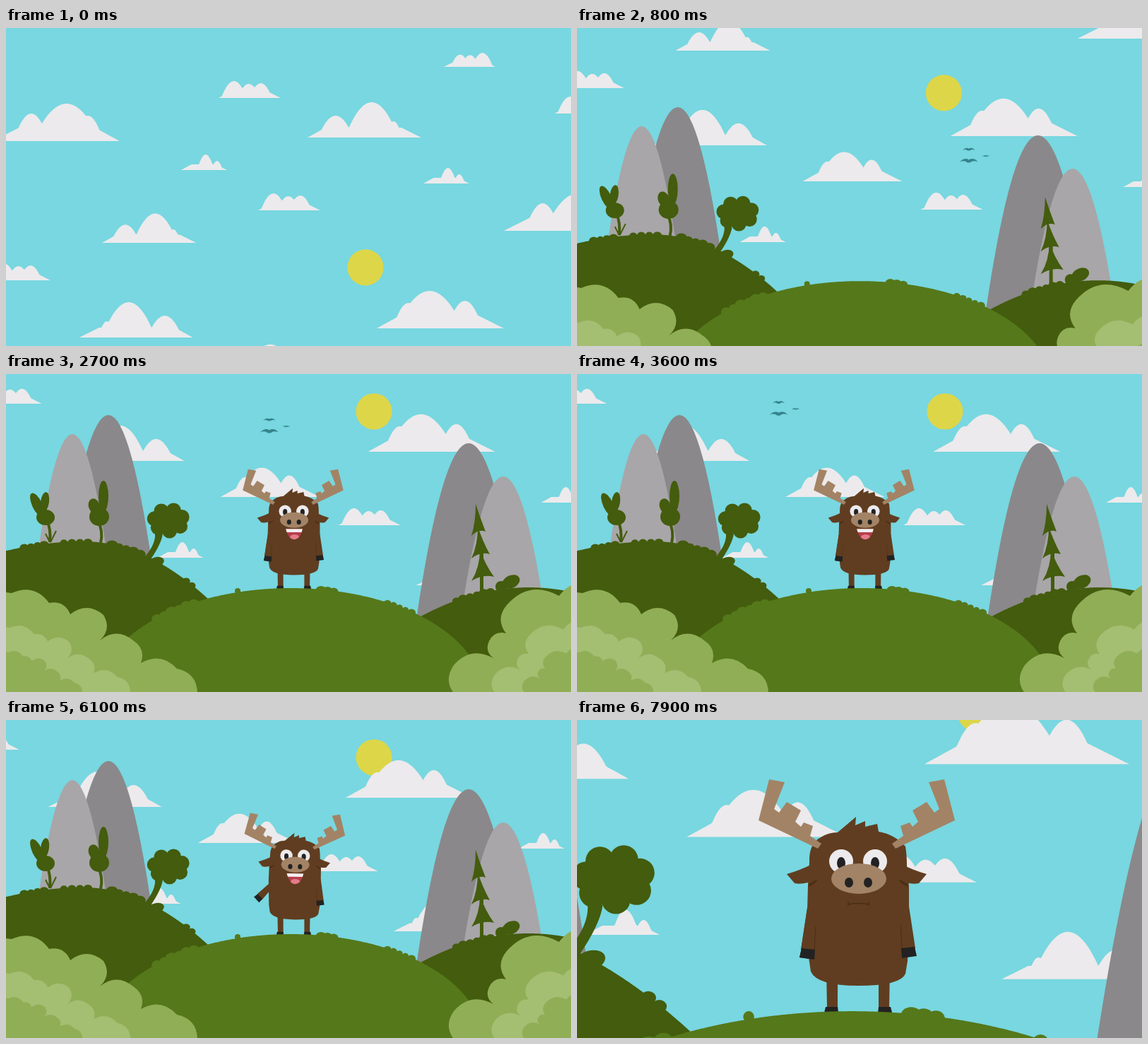
Recreate the animation shown at these times as an HTML page with a canvas. Size 800x450 px, loop 8000 ms.

```html
<!DOCTYPE html>
<html>
<head>
<meta charset="utf-8">
<title>Moose on a hill</title>
<style>
html, body { margin: 0; width: 100%; height: 100%; overflow: hidden; background: #78d7e0; }
canvas { display: block; width: 100vw; height: 100vh; }
</style>
</head>
<body>
<canvas id="stage" width="800" height="450"></canvas>
<script>
const g = document.getElementById('stage').getContext('2d');
const LOOP = 8000, STEP = 100, ZOOM = 1.949;
const SKY = '#78d7e0', DARK = '#435c0d', HILL = '#55781a', LEAF = '#90ae56', LIGHT = '#a4be72';
const ROCK = '#8a888a', PALE_ROCK = '#a8a6a8';
const FUR = '#603d20', FUR_DARK = '#4c2e15', TAN = '#a38365', BLACK = '#222', WHITE = '#eceaec';

const clamp = v => Math.max(0, Math.min(1, v));
const smooth = u => { u = clamp(u); return u * u * (3 - 2 * u); };
const ramp = (t, a, b) => smooth((t - a) / (b - a));
const noise = n => { const v = Math.sin(n * 12.9898) * 43758.5453; return v - Math.floor(v); };

function fill(color, path) {
  g.fillStyle = color;
  g.fill(new Path2D(path));
}
function line(color, width, path) {
  g.strokeStyle = color;
  g.lineWidth = width;
  g.stroke(new Path2D(path));
}
function oval(color, x, y, rx, ry = rx, deg = 0) {
  g.fillStyle = color;
  g.beginPath();
  g.ellipse(x, y, rx, ry, deg * Math.PI / 180, 0, 7);
  g.fill();
}
// Area between a curve y = f(x) and a flat base.
function area(color, f, x0, x1, base) {
  g.fillStyle = color;
  g.beginPath();
  g.moveTo(x0, base);
  for (let x = x0; x <= x1; x++) g.lineTo(x, f(x));
  g.lineTo(x1, base);
  g.fill();
}
function mirrored(axis, part) {
  part();
  g.save();
  g.translate(2 * axis, 0);
  g.scale(-1, 1);
  part();
  g.restore();
}

// Perspective camera: depth p sets both parallax and zoom.
let pan = 0, zoom = 0;
function camera(p) {
  const s = 1 / (1 - (1 - 1 / ZOOM) * zoom * p);
  const ox = p * (8.5 * zoom + 17 * pan), oy = -p * (18 * zoom + 405 * pan);
  g.setTransform(s, 0, 0, s, 400 - s * (400 + ox), 225 - s * (225 + oy));
}

// Cloud: a low skirt topped by humps [centre, height, half width].
const cloudShapes = {
  A: { width: 180, skirt: 18, humps: [[45, 36, 22], [75, 53, 48], [125, 39, 25]] },
  B: { width: 161, skirt: 14, humps: [[40, 31, 25], [91, 50, 38], [122, 23, 12]] },
  C: { width: 88, skirt: 8, humps: [[22, 24, 18], [43, 20, 16], [60, 21, 16]] },
  D: { width: 65, skirt: 8, humps: [[35, 22, 12], [51, 13, 8]] }
};
// shape, x, y, scale (negative is mirrored)
const clouds = [
  ['A', 538, 110, 1], ['A', -6, -155, -1], ['A', 718, -28, -1], ['A', 329, 174, .78],
  ['B', 440, -160, 1], ['B', 149, -11, .83], ['B', 117, 123, -1], ['B', 606, 299, -.83],
  ['C', 314, -216, 1], ['C', 633, -260, -.83], ['C', 370, -57, 1], ['C', -12, 42, 1],
  ['C', 790, -194, 1], ['C', 496, 214, 1],
  ['D', 261, -114, 1], ['D', 604, -95, 1], ['D', 240, 260, 1], ['D', 783, 182, 1]
];
function drawClouds(t) {
  for (const [kind, x, y, scale] of clouds) {
    const { width, skirt, humps } = cloudShapes[kind];
    const top = u => -Math.max(
      Math.min(u * .55, (width - u) * .5, skirt),
      ...humps.map(([c, h, w]) => h * (1 - ((u - c) / w) ** 2)));
    g.save();
    g.translate(x - 9.4 * t + (scale < 0 ? -width * scale : 0), y);
    g.scale(scale, Math.abs(scale));
    area(WHITE, top, 0, width, 0);
    g.restore();
  }
}

function drawBirds(t) {
  for (const [x, y, size] of [[460, 105, 1], [460, 89, .68], [484, 98.5, .42]]) {
    g.save();
    g.translate(x - 97 * (t - 1.8), y - 27.3 * (t - 1.8));
    g.scale(size, size);
    fill('#35838c', 'M-13 2Q-5-5 0-1Q7-5 13 2Q6-1 2 3L-2 3Q-6-1-13 2Z');
    g.restore();
  }
}

function mountain(color, x, top, k, base) {
  const w = k * Math.sqrt(base - top);
  fill(color, `M${x - w} ${base}Q${x} ${2 * top - base} ${x + w} ${base}Z`);
}
function drawMountains() {
  mountain(ROCK, 145, 58, 4.25, 300);
  mountain(PALE_ROCK, 94, 85, 3.76, 300);
  mountain(ROCK, 655, 98, 4.69, 370);
  mountain(PALE_ROCK, 704, 145, 4.26, 340);
}

const leftLand = x => 237 + (x < 110 ? .0011 : .00262) * (x - 110) ** 2;
const rightLand = x => 302 + .00176 * (x - 740) ** 2;
const hillTop = x => 453 - 150 * Math.sqrt(Math.max(0, 1 - ((x - 403) / 272) ** 2));

// Row of small round shrubs along the ground.
function shrubs(color, ground, x0, x1, size) {
  const n = Math.max(1, Math.round((x1 - x0) / size / 1.4));
  for (let i = 0; i <= n; i++) {
    const x = x0 + (x1 - x0) * i / n, r = size * (.75 + .4 * noise(i + x0));
    oval(color, x, ground(x) + r * .2, r, r * .85);
  }
}

function pine() {
  g.fillStyle = DARK;
  g.fillRect(671, 240, 5, 72);
  for (let i = 0; i < 3; i++) {
    const x = 669 + 3 * i, base = 225 + 32 * i, w = 10 + 3 * i;
    fill(DARK, `M${x - 4} ${base - 41}Q${x - 4} ${base - 15} ${x - w} ${base + 4}Q${x} ${base - 6} ${x + w} ${base - 2}Q${x + 3} ${base - 20} ${x - 4} ${base - 41}Z`);
  }
}
function roundTree() {
  for (let i = 0; i < 7; i++) {
    const a = i / 7 * 2 * Math.PI - 1.2;
    oval(DARK, 230 + 20 * Math.cos(a), 207 + 15 * Math.sin(a), 10.5);
  }
  oval(DARK, 230, 207, 23, 18);
  fill(DARK, 'M211 226L222 226Q220 240 205 262L198 257Q212 240 211 226Z');
}
function saplings() {
  oval(DARK, 44, 185, 7, 18, -25);
  oval(DARK, 55, 181, 6, 14, 8);
  oval(DARK, 56, 203, 13, 11);
  line(DARK, 4, 'M58 207Q64 220 62 238M130 208Q138 222 134 239');
  line(DARK, 2, 'M63 238L71 222M62 238L56 226');
  oval(DARK, 138, 173, 7, 22);
  oval(DARK, 125, 187, 8, 11, -20);
  oval(DARK, 132, 202, 14, 13);
}

function drawLand() {
  area(DARK, leftLand, -40, 300, 650);
  area(DARK, rightLand, 565, 860, 650);
  shrubs(DARK, leftLand, 26, 54, 7);
  shrubs(DARK, leftLand, 82, 116, 7);
  shrubs(DARK, leftLand, 150, 190, 8);
  shrubs(DARK, leftLand, 255, 263, 5);
  oval(DARK, 213, 266, 11, 7, -15);
  shrubs(DARK, rightLand, 638, 686, 7);
  oval(DARK, 701, 301, 8);
  oval(DARK, 715, 294, 13, 9, -25);
  saplings();
  roundTree();
  pine();
}

function drawHill() {
  area(HILL, hillTop, 131, 675, 650);
  shrubs(HILL, hillTop, 214, 266, 8);
  shrubs(HILL, hillTop, 446, 464, 7);
  shrubs(HILL, hillTop, 540, 574, 6);
  oval(HILL, 328, 307, 4);
}

// Lobed outline around a bottom corner, repeated smaller for each inner layer.
function bush(corner, side, pts) {
  [[LEAF, 1], [LIGHT, .65], [LEAF, .4]].forEach(([color, k]) => {
    const at = ([x, y]) => [corner + (x - corner) * k, 450 + (y - 450) * k];
    g.fillStyle = color;
    g.beginPath();
    g.moveTo(corner, 600);
    pts.map(at).forEach(([u, v], i, all) => {
      if (!i) return g.lineTo(u, v);
      const [x, y] = all[i - 1];
      g.quadraticCurveTo((x + u) / 2 + side * (v - y) * .4, (y + v) / 2 - side * (u - x) * .4, u, v);
    });
    g.lineTo(pts[pts.length - 1][0], 600);
    g.fill();
  });
}
function drawBushes() {
  bush(0, 1, [[-40, 335], [8, 310], [61, 324], [91, 340], [138, 341], [133, 377], [180, 377], [191, 409], [242, 417], [271, 452]]);
  bush(800, -1, [[840, 300], [783, 314], [709, 327], [708, 367], [684, 378], [690, 402], [634, 412], [637, 455]]);
}

function antler() {
  fill(TAN, 'M272 83L294 87L279 125L286 130L297 115L317 127L309 143L317 150L321 144L334 149L330 163L346 174L341 181L257 141Z');
}
function ear() {
  fill(FUR, 'M335 202Q315 212 297 217L308 230Q320 233 342 224Z');
}
function leg() {
  fill(FUR, 'M353 350H369V408H354Z');
  fill(BLACK, 'M352 405H369L370 413H350Z');
}
function arm() {
  fill(FUR, 'M326 265Q332 258 338 268L337 326L317 324Z');
  line(FUR_DARK, 1, 'M337.5 292L336 325');
  fill(BLACK, 'M318 322L337 324L336 338L315 335Z');
}
function eye() {
  oval(WHITE, 374, 199, 17);
  oval(BLACK, 374, 201.5, 6, 8.5);
}
function mouth(open) {
  if (!open) return line(FUR_DARK, 1.8, 'M384 260Q399 257 413 260M384 256V262M413 256V262');
  g.save();
  g.clip(new Path2D('M376 248H422Q416 276 399 277Q383 276 376 248Z'));
  g.fillStyle = '#b63d4b';
  g.fillRect(370, 245, 60, 35);
  oval('#e57b89', 400, 273, 14, 10);
  g.fillStyle = '#f2f0f0';
  g.fillRect(370, 245, 60, 12);
  g.restore();
}

function drawMoose(t) {
  const hidden = 180 - 72 * ramp(t, 1.35, 1.8) - 108 * ramp(t, 2.1, 2.55);
  const wave = ramp(t, 3.8, 4.2) * (1 - ramp(t, 5.9, 6.3));
  g.translate(407.5 + 8.5 * 0, 207.5 + hidden);
  g.scale(1 / ZOOM, 1 / ZOOM);
  g.translate(-398, -225);
  mirrored(398, leg);

  // lean while waving
  g.translate(400, 405 - 8 * wave);
  g.rotate(.035 * wave);
  g.translate(-400, -405);

  g.save();
  g.translate(330, 284);
  g.rotate(wave * (64 + 14 * Math.sin((t - 5.2) * 9)) * Math.PI / 180);
  g.translate(-330, -284);
  arm();
  g.restore();

  mirrored(396, ear);
  fill(FUR, 'M326 268L327 232L329 200Q328 174 345 165Q356 158 369 158L395 136L394 148L408 142L408 150L425 146L427 157Q450 161 465 178Q467 190 467 205L470 234V268L468 340L465 358Q458 375 398 375Q340 375 331 355L328 335Z');
  mirrored(398, () => fill(FUR_DARK, 'M328 231L341 224Q338 231 328 235Z'));
  g.save();
  g.translate(796, -2);
  g.scale(-1, 1);
  arm();
  g.restore();
  if (wave < .05) arm();

  mirrored(396, antler);
  mirrored(398, eye);
  oval(TAN, 399, 223.5, 39, 21.5);
  mirrored(398.5, () => oval(BLACK, 385, 229, 6, 7));
  mouth(t < 7.3);
}

function draw(now) {
  const t = Math.floor(now % LOOP / STEP) * STEP / 1000;
  pan = 1 - smooth(Math.pow(clamp(t / 1.2), .65));
  zoom = ramp(t, 6.3, 6.75);

  g.setTransform(1, 0, 0, 1, 0, 0);
  g.fillStyle = SKY;
  g.fillRect(0, 0, 800, 450);

  camera(.706);
  oval('#ddd649', 521, 53, 25.6);
  camera(.778);
  drawClouds(t);
  camera(.98);
  drawMountains();
  camera(1);
  drawBirds(t);
  drawLand();
  drawMoose(t);
  camera(1);
  drawHill();
  camera(1.05);
  drawBushes();
}

const start = performance.now();
function tick() {
  draw(performance.now() - start);
  requestAnimationFrame(tick);
}
tick();
</script>
</body>
</html>
```
